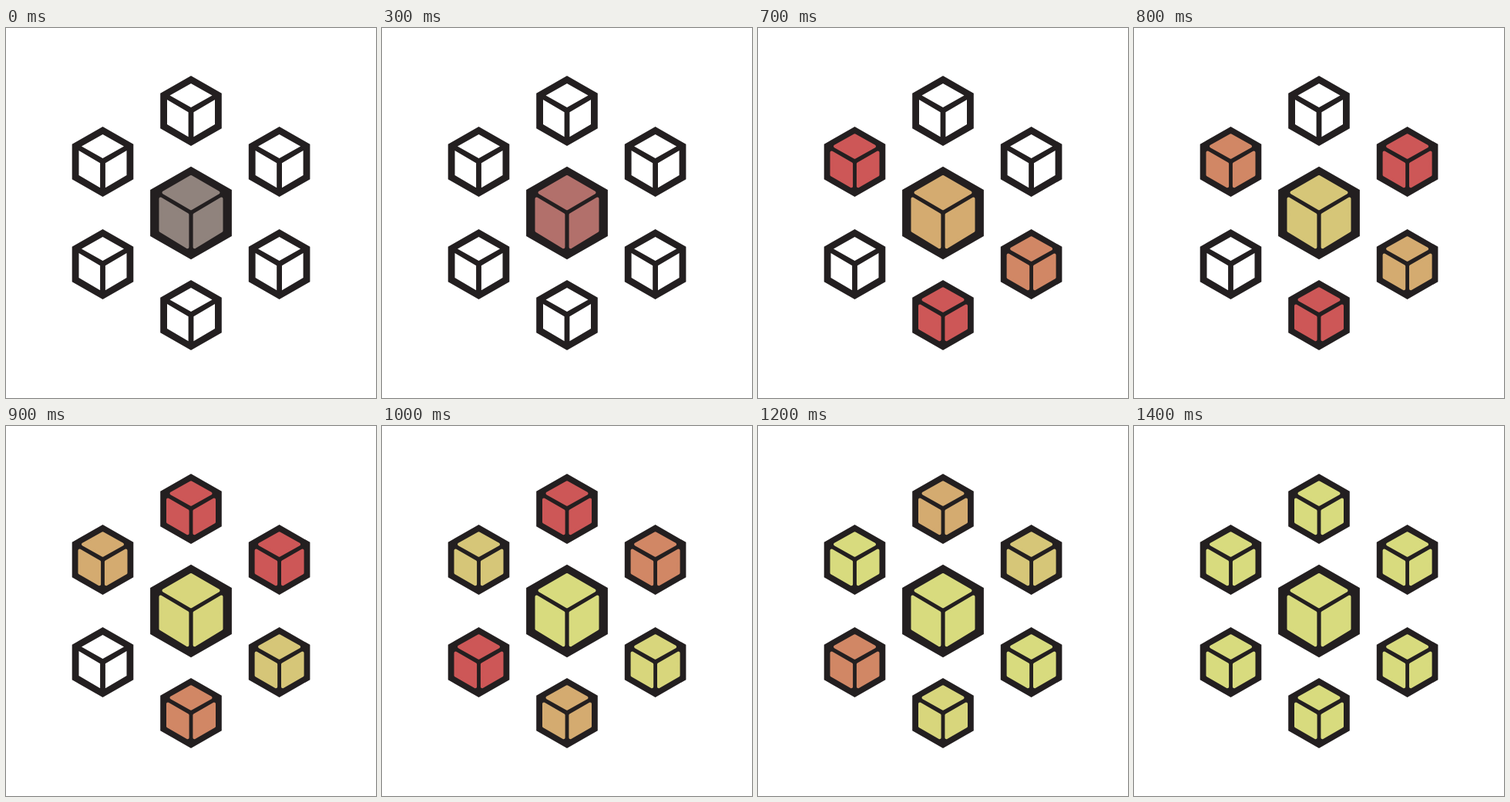
These frames come from a looping animation (480 by 480 pixels, 1500 ms). An HTML page:

```html
<!DOCTYPE html>
<html lang="en">
<head>
<meta charset="utf-8">
<title>Cubes</title>
<style>
  html, body { margin: 0; width: 100%; height: 100%; overflow: hidden; background: #fff; }
  svg { display: block; width: 100vw; height: 100vh; }
  .hex { fill: #231f20; }
  .blank { fill: #fff; }
  .tint { fill: currentColor; stroke: currentColor; stroke-width: 4; stroke-linejoin: round; }
</style>
</head>
<body>
<svg viewBox="0 0 480 480">
  <defs>
    <path id="hex" class="hex" d="M0-45.5 39.8-22.7V22.7L0 45.5-39.8 22.7V-22.7Z"/>
    <path id="blank" class="blank" d="M0-35.5 27.5-20 0-4.5-27.5-20ZM-31-14.5-3.4 1.7V33.8L-31 17.5ZM31-14.5 3.4 1.7V33.8L31 17.5Z"/>
    <path id="tint" class="tint" d="M0-34.2 25.5-20 0-5.8-25.5-20ZM-30-12-4.4 2.8V31.8L-30 17ZM30-12 4.4 2.8V31.8L30 17Z"/>
    <path id="bigHex" class="hex" d="M0-60.2 52.9-30V30L0 60.2-52.9 30V-30Z"/>
    <path id="bigTint" class="tint" d="M0-47 35.5-26.5 0-5.7-35.5-26.5ZM-39.5-18.5-4.6 2.2V44.2L-39.5 23ZM39.5-18.5 4.6 2.2V44.2L39.5 23Z"/>
  </defs>
  <g id="core" transform="translate(240 240)">
    <use href="#bigHex"/><use href="#bigTint"/>
  </g>
</svg>
<script>
const STEP = 100, STEPS = 15;
const GREY = [144, 131, 125], ROSE = [178, 112, 107], RED = [205, 87, 87], LIME = [216, 219, 126];
// In the order in which they light up
const SPOTS = [[354.6, 306.5], [125.5, 173.5], [240, 372.5], [354.6, 173.5], [240, 107.5], [125.5, 306.5]];

const svg = document.querySelector('svg');
const core = document.getElementById('core');

const cubes = SPOTS.map(([x, y]) => {
  const g = document.createElementNS('http://www.w3.org/2000/svg', 'g');
  g.setAttribute('transform', `translate(${x} ${y})`);
  g.innerHTML = '<use href="#hex"/><use/>';
  svg.append(g);
  return g;
});

const clamp = v => Math.min(1, Math.max(0, v));
const mix = (a, b, t) => `rgb(${a.map((v, i) => Math.round(v + (b[i] - v) * t))})`;
// Red to lime in five steps, easing out
const ripen = n => mix(RED, LIME, 1 - (1 - clamp(n / 5)) ** 2);

function coreColor(n) {
  if (n < 3) return mix(GREY, ROSE, n / 3);
  if (n < 5) return mix(ROSE, RED, (n - 3) / 2);
  return ripen(n - 5);
}

function draw() {
  const n = Math.floor(performance.now() / STEP) % STEPS;
  core.style.color = coreColor(n);
  cubes.forEach((cube, i) => {
    const age = n - 5 - i;
    cube.lastChild.setAttribute('href', age < 0 ? '#blank' : '#tint');
    cube.style.color = n === STEPS - 1 ? ripen(5) : ripen(age - 1);
  });
  requestAnimationFrame(draw);
}
draw();
</script>
</body>
</html>
```
